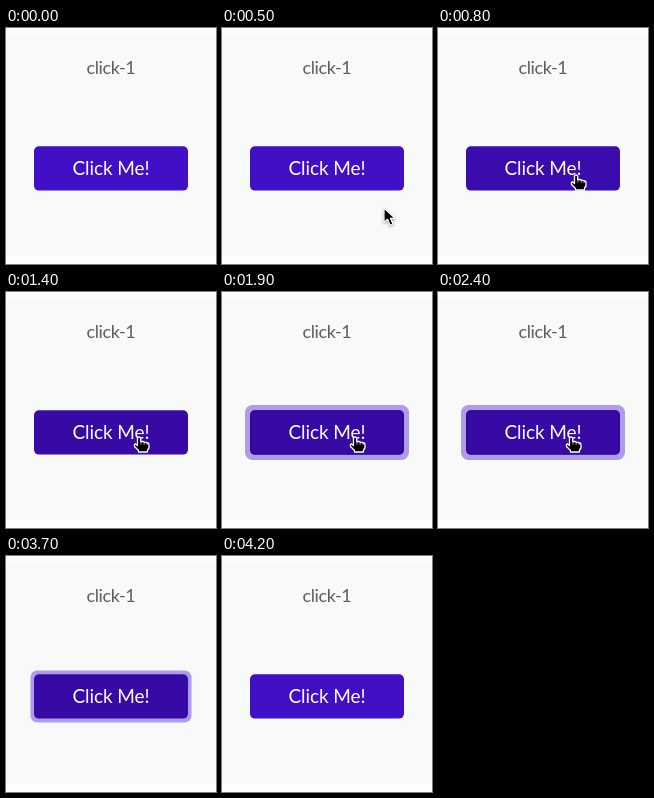
Recreate the animation shown at these times as an HTML page. Size 210x236 px, loop 5 s.

```html
<!DOCTYPE html>
<html lang="en">
<head>
<meta charset="utf-8">
<title>Click button</title>
<style>
  html, body { margin: 0; width: 100%; height: 100%; overflow: hidden; background: #fdfdfd; }
  svg { display: block; width: 210px; height: 236px; }
  text { font-family: Lato, "Open Sans", sans-serif; text-anchor: middle; }
  #arrow path { filter: drop-shadow(0 1px 1px #0006); }
</style>
</head>
<body>
<svg viewBox="0 0 210 236">
  <rect y="7" width="210" height="220" fill="#f8faf9"/>
  <text x="105" y="46" font-size="18" letter-spacing="-.4" fill="#5a5e64">click-1</text>
  <rect id="ring" fill="#ad9ce9"/>
  <rect id="button" x="28" y="118.2" width="154" height="44.4" rx="5"/>
  <rect id="inset" x="29" y="119" width="152" height="43" rx="4" fill="none" stroke="#2d0886" stroke-width="2"/>
  <text x="105" y="147" font-size="19" letter-spacing="-.1" fill="#fff">Click Me!</text>
  <g id="arrow" stroke="#fff" stroke-width="1.2" stroke-linejoin="round">
    <path d="M1 1V15.5L4.5 12.3L7.1 18.2L10 17L7.4 11.3H12Z" fill="#000"/>
  </g>
  <g id="hand" stroke="#fff" stroke-width="1.3" stroke-linejoin="round">
    <path d="M-1.5 1.5Q-1.5 0 0 0Q1.7 0 1.7 1.5V4.5H4Q5 4.5 5.2 5.3H7Q8 5.3 8.2 6H9Q10 6.2 10 7.5V11L8.5 13V15H-.5V13.5L-4.5 9.5Q-5 7 -3.3 7L-1.5 8.5Z" fill="#000"/>
    <path d="M1.9 5V7.5M5.2 5.5V7.7M8 6.2V8" stroke-width=".7"/>
  </g>
</svg>
<script>
  const LOOP = 5000, STEP = 100;
  const NORMAL = [64, 15, 197], HOVER = [56, 10, 165];
  const [ring, button, inset, arrow, hand] =
    ["ring", "button", "inset", "arrow", "hand"].map(id => document.getElementById(id));

  // Cursor path: time, x, y
  const path = [
    [300, 193, 217], [400, 174, 201], [500, 161, 179], [600, 150, 161],
    [800, 138, 147], [1100, 133, 145], [2500, 133, 145], [2600, 150, 172], [2700, 170, 207]
  ];
  const clamp = v => Math.min(1, Math.max(0, v));
  const ramp = (t, from, to) => clamp((t - from) / (to - from));
  const mix = (a, b, k) => a + (b - a) * k;

  function cursorAt(t) {
    const next = Math.max(1, path.findIndex(p => p[0] >= t));
    const a = path[next - 1], b = path[next];
    const k = ramp(t, a[0], b[0]);
    return [mix(a[1], b[1], k), mix(a[2], b[2], k)];
  }

  function show(el, visible) {
    el.setAttribute("visibility", visible ? "visible" : "hidden");
  }

  function drawCursor(t) {
    const present = t >= 300 && t < 2800;
    const pointing = t >= 600 && t < 2600;
    show(hand, present && pointing);
    show(arrow, present && !pointing);
    if (!present) return;
    const [x, y] = cursorAt(t);
    (pointing ? hand : arrow).setAttribute("transform", `translate(${x} ${y})`);
  }

  function drawButton(t) {
    const shade = ramp(t, 500, 900) * (1 - ramp(t, 3700, 3800));
    button.setAttribute("fill", `rgb(${NORMAL.map((c, i) => Math.round(mix(c, HOVER[i], shade)))})`);

    const grow = ramp(t, 1700, 1900);
    const shrink = ramp(t, 3500, 3800);
    const spread = t < 3800 ? 5 * grow - 2.2 * shrink : 0;
    const box = { x: 28 - spread, y: 118 - spread, width: 154 + 2 * spread, height: 45 + 2 * spread, rx: 5 + spread * 0.5 };
    for (const key in box) ring.setAttribute(key, box[key]);
    show(ring, spread > 0);
    inset.setAttribute("opacity", t < 3600 ? 0.6 * grow : 0);
  }

  function draw(time) {
    const t = Math.floor((time % LOOP) / STEP) * STEP;
    drawCursor(t);
    drawButton(t);
  }

  const start = performance.now();
  function tick(now) {
    draw(Math.max(0, now - start));
    requestAnimationFrame(tick);
  }
  draw(0);
  requestAnimationFrame(tick);
</script>
</body>
</html>
```
